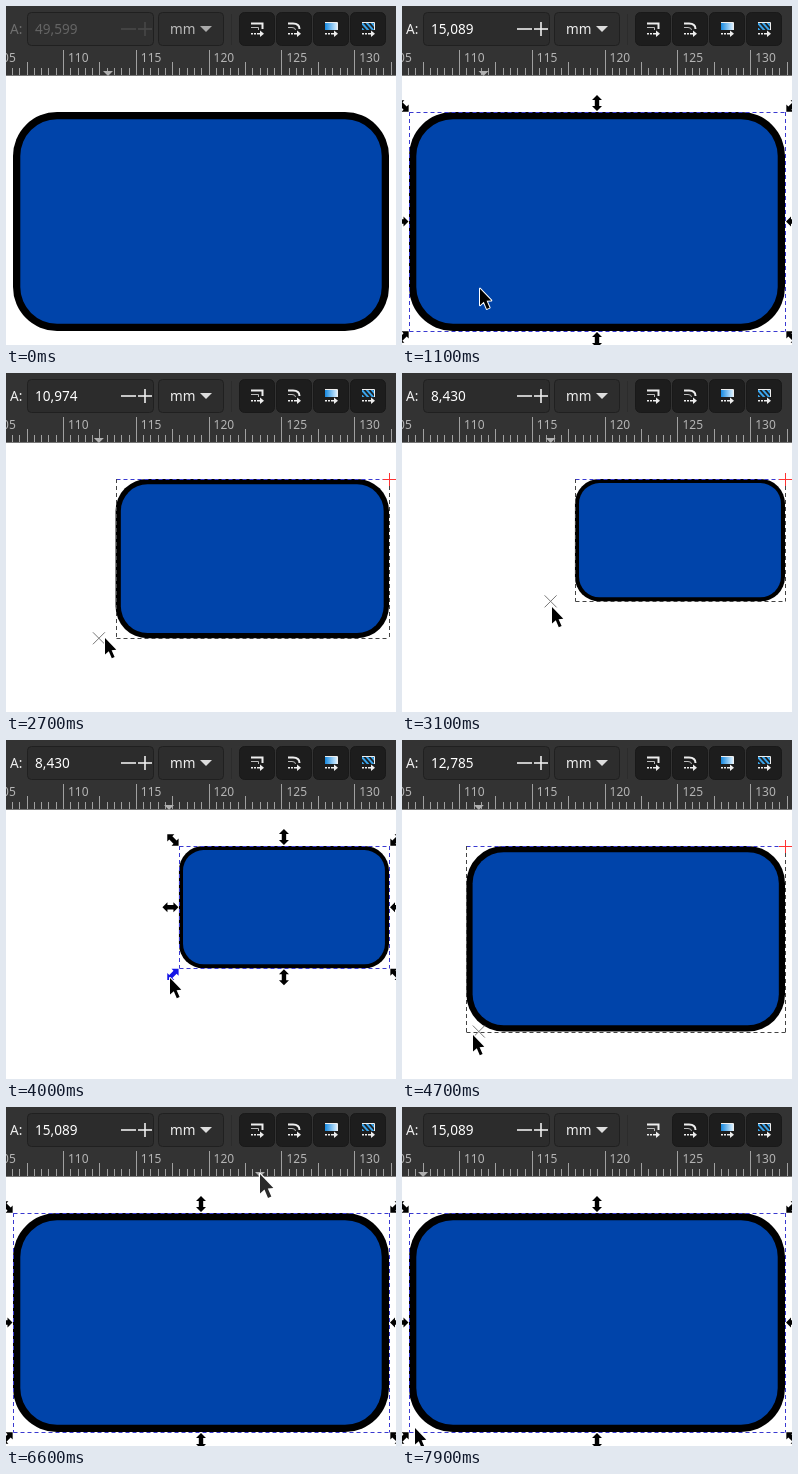
An HTML page with a canvas that plays this animation: 390x339 px, repeating every 8 s.

```html
<!DOCTYPE html>
<html lang="en">
<head>
<meta charset="utf-8">
<title>Scaling a rounded rectangle</title>
<style>
  html, body { margin: 0; width: 100%; height: 100%; overflow: hidden; background: #fff; }
  canvas { display: block; width: 390px; height: 339px; }
</style>
</head>
<body>
<canvas id="stage"></canvas>
<script>
const W = 390, H = 339, LOOP = 8000, STEP = 100;
const FULL = 15.089, RIGHT = 383, TOP = 106, WIDE = 376, TALL = 219;
const FONT = '"Noto Sans", "Open Sans", sans-serif';
const canvas = document.getElementById('stage');
const dpr = window.devicePixelRatio || 1;
canvas.width = W * dpr;
canvas.height = H * dpr;
const c = canvas.getContext('2d');

// time, x, y of the pointer
const pointerKeys = [
  [0, 102, 342], [100, 96, 312], [300, 88, 285], [600, 113, 268], [900, 113, 268],
  [1500, 8, 312], [1800, 8, 312], [2100, 4, 330], [2300, 4, 329], [2400, 12, 325],
  [2500, 38, 306], [2700, 99, 265], [2900, 136, 242], [3100, 150, 234], [3500, 150, 234],
  [3600, 150, 238], [3700, 150, 238], [4000, 164, 238], [4300, 165, 238], [4400, 158, 241],
  [4800, 42, 313], [5000, 40, 306], [5800, 40, 306], [5900, 41, 329], [6600, 254, 67],
  [6700, 252, 48], [7100, 255, 25], [7300, 255, 25], [7900, 13, 321]
];

// time, height of the shape in mm
const sizeKeys = [
  [0, FULL], [2400, FULL], [2500, 13.9], [2700, 10.974], [2900, 9.13], [3100, 8.43],
  [4300, 8.43], [4400, 8.6], [4800, 14.18], [5000, 13.65], [5999, 13.65],
  [6000, 8.43], [6199, 8.43], [6200, FULL]
];

function sample(keys, t, k) {
  const i = keys.findIndex(p => p[0] > t);
  if (i < 0) return keys[keys.length - 1][k];
  if (i === 0) return keys[0][k];
  const a = keys[i - 1], b = keys[i];
  return a[k] + (b[k] - a[k]) * (t - a[0]) / (b[0] - a[0]);
}

const within = (t, a, b) => t >= a && t < b;

function box(x, y, w, h, r, fill, stroke) {
  c.beginPath();
  c.roundRect(x, y, w, h, r);
  if (fill) { c.fillStyle = fill; c.fill(); }
  if (stroke) { c.strokeStyle = stroke; c.lineWidth = 1; c.stroke(); }
}

function line(points, color, width = 1) {
  c.beginPath();
  points.forEach(([x, y], i) => i ? c.lineTo(x, y) : c.moveTo(x, y));
  c.strokeStyle = color;
  c.lineWidth = width;
  c.stroke();
}

function poly(points, fill) {
  c.beginPath();
  points.forEach(([x, y]) => c.lineTo(x, y));
  c.closePath();
  c.fillStyle = fill;
  c.fill();
}

function label(text, x, y, size, color) {
  c.font = size + 'px ' + FONT;
  c.fillStyle = color;
  c.fillText(text, x, y);
}

function at(x, y, draw, turn = 0, scale = 1) {
  c.save();
  c.translate(x, y);
  c.rotate(turn);
  c.scale(scale, scale);
  draw();
  c.restore();
}

function dottedArrow() {
  c.fillStyle = '#eee';
  c.fillRect(-6, 5, 2, 1.5);
  c.fillRect(-3, 5, 2, 1.5);
  c.fillRect(0, 5, 4, 1.5);
  poly([[3, 2.5], [7, 5.8], [3, 9]], '#eee');
}

const icons = [
  () => {
    line([[-6, -4.5], [5.5, -4.5], [5.5, 1]], '#eee', 2);
    line([[-6, -.5], [1.5, -.5], [1.5, 2]], '#bbb');
  },
  () => {
    c.strokeStyle = '#eee';
    c.lineWidth = 2;
    c.beginPath();
    c.moveTo(-6, -4.5);
    c.lineTo(-1, -4.5);
    c.quadraticCurveTo(5.5, -4.5, 5.5, 1);
    c.stroke();
    c.strokeStyle = '#bbb';
    c.lineWidth = 1;
    c.beginPath();
    c.moveTo(-6, -.5);
    c.lineTo(-2, -.5);
    c.quadraticCurveTo(1.5, -.5, 1.5, 2);
    c.stroke();
  },
  () => {
    const g = c.createLinearGradient(-6, 0, 6, 0);
    g.addColorStop(0, '#1689e0');
    g.addColorStop(1, '#d8efff');
    c.fillStyle = g;
    c.fillRect(-6, -5, 12, 7);
    line([[-6, -5.5], [6.5, -5.5], [6.5, 2]], '#eee');
  },
  () => {
    c.save();
    c.beginPath();
    c.rect(-6, -5, 12, 7);
    c.clip();
    for (let x = -12; x < 10; x += 5) line([[x, -6], [x + 8, 3]], '#3aa5ec', 2);
    c.restore();
    line([[-6, -5.5], [6.5, -5.5], [6.5, 2]], '#eee');
  }
];

function toolbar(t, size) {
  const on = t >= 900;
  c.fillStyle = '#333';
  c.fillRect(0, 0, W, 70);
  label('A:', 4, 28, 13.6, on ? '#eee' : '#707070');
  box(21.5, 6.5, 126, 33, 4, on ? '#2c2c2c' : '#303030', '#202020');
  label(on ? size.toFixed(3).replace('.', ',') : '49,599', 29, 28, 13.6, on ? '#fff' : '#646464');
  const sign = on ? '#eee' : '#484848';
  line([[115, 23], [130, 23]], sign, 1.6);
  line([[132, 23], [146, 23]], sign, 1.6);
  line([[139, 16], [139, 30]], sign, 1.6);
  box(152.5, 6.5, 65, 33, 4, '#2d2d2d', '#202020');
  label('mm', 164, 28, 13.6, on ? '#eee' : '#bbb');
  poly([[194, 20], [206, 20], [200, 26]], on ? '#ddd' : '#aaa');
  line([[225.5, 8], [225.5, 39]], '#2c2c2c');
  icons.forEach((icon, i) => {
    const x = 233 + i * 37;
    if (i || t < 7300) box(x + .5, 6.5, 35, 33, 5, '#1d1d1d', '#191919');
    at(x + 18, 22, () => { icon(); dottedArrow(); });
  });
}

function ruler(mark) {
  for (let i = -8; i < 46; i++) {
    const x = Math.round(57 + i * 7.28) + .5;
    const top = i % 10 === 0 ? 44 : i % 5 === 0 ? 56 : 62;
    line([[x, top], [x, 69]], '#a0a0a0');
  }
  for (let i = -1; i < 5; i++) label(String(110 + i * 5), 62 + i * 72.8, 56, 12, '#b4b4b4');
  line([[0, 69.5], [W, 69.5]], '#777');
  poly([[mark - 5, 65], [mark + 5, 65], [mark, 70]], '#b0b0b0');
}

function shape(s) {
  const w = 7.3 * s;
  const x = RIGHT - WIDE * s, h = TALL * s;
  box(x, TOP, WIDE * s, h, 44 * s, '#000');
  box(x + w, TOP + w, WIDE * s - 2 * w, h - 2 * w, 36.7 * s, '#04a');
}

function frame(left, bottom, color) {
  const x = Math.round(left) + .5, y = Math.round(bottom) + .5;
  c.setLineDash([4, 3]);
  line([[x, TOP + .5], [RIGHT + .5, TOP + .5]], '#3a3ad0');
  line([[RIGHT + .5, TOP], [RIGHT + .5, y]], color);
  line([[x, TOP], [x, y]], color);
  line([[x, y], [RIGHT + .5, y]], color);
  c.setLineDash([]);
}

function handle(x, y, turn, color = '#000') {
  const half = [[-8, 0], [-3, -5], [-3, -2.2], [3, -2.2], [3, -5], [8, 0]];
  const rest = half.slice(1, 5).reverse().map(([a, b]) => [a, -b]);
  at(x, y, () => poly([...half, ...rest], color), turn);
}

function handles(left, bottom, hot) {
  const q = Math.PI / 4;
  const mx = (left + RIGHT) / 2, my = (TOP + bottom) / 2;
  handle(left - 6, TOP - 6, q);
  handle(RIGHT + 7, TOP - 6, -q);
  handle(left - 6, bottom + 6, -q, hot ? '#1414e6' : '#000');
  handle(RIGHT + 7, bottom + 6, q);
  handle(left - 8.5, my, 0);
  handle(RIGHT + 9, my, 0);
  handle(mx, TOP - 9, 2 * q);
  handle(mx, bottom + 9, 2 * q);
}

function pointer(x, y) {
  const big = y < 70;
  at(x, y, () => {
    c.beginPath();
    [[0, 0], [0, 16.5], [3.8, 13.2], [6.8, 20.3], [9.6, 19], [6.6, 12.2], [11.3, 11.8]]
      .forEach(p => c.lineTo(...p));
    c.closePath();
    c.lineJoin = 'round';
    c.strokeStyle = '#fff';
    c.lineWidth = 2;
    c.stroke();
    c.fillStyle = big ? '#2b2b2b' : '#000';
    c.fill();
    c.lineJoin = 'miter';
  }, 0, big ? 1.18 : 1);
}

function render(t) {
  const x = sample(pointerKeys, t, 1), y = sample(pointerKeys, t, 2);
  const mark = within(t, 6600, 7400) ? 254 : sample(pointerKeys, t - 20, 1);
  const size = sample(sizeKeys, t, 1), s = size / FULL;
  const left = RIGHT - WIDE * s, bottom = TOP + TALL * s;
  const drag = within(t, 2400, 3300) || within(t, 4400, 5400);
  const hot = within(t, 2000, 2400) || within(t, 3900, 4400) || within(t, 5400, 5900);

  c.setTransform(dpr, 0, 0, dpr, 0, 0);
  c.fillStyle = '#fff';
  c.fillRect(0, 0, W, H);
  shape(s);
  if (t >= 900) {
    frame(left, bottom, drag ? '#444' : '#3a3ad0');
    if (drag) {
      line([[mark - 6, bottom - 6], [mark + 6, bottom + 6]], '#777');
      line([[mark - 6, bottom + 6], [mark + 6, bottom - 6]], '#777');
      line([[RIGHT - 6, TOP + .5], [RIGHT + 7, TOP + .5]], '#f33');
      line([[RIGHT + .5, TOP - 6], [RIGHT + .5, TOP + 7]], '#f33');
    } else {
      handles(left, bottom, hot);
    }
  }
  toolbar(t, size);
  ruler(mark);
  pointer(x, y);
}

const start = performance.now();
function tick() {
  const t = (performance.now() - start) % LOOP;
  render(Math.floor(t / STEP) * STEP);
  requestAnimationFrame(tick);
}
tick();
</script>
</body>
</html>
```
